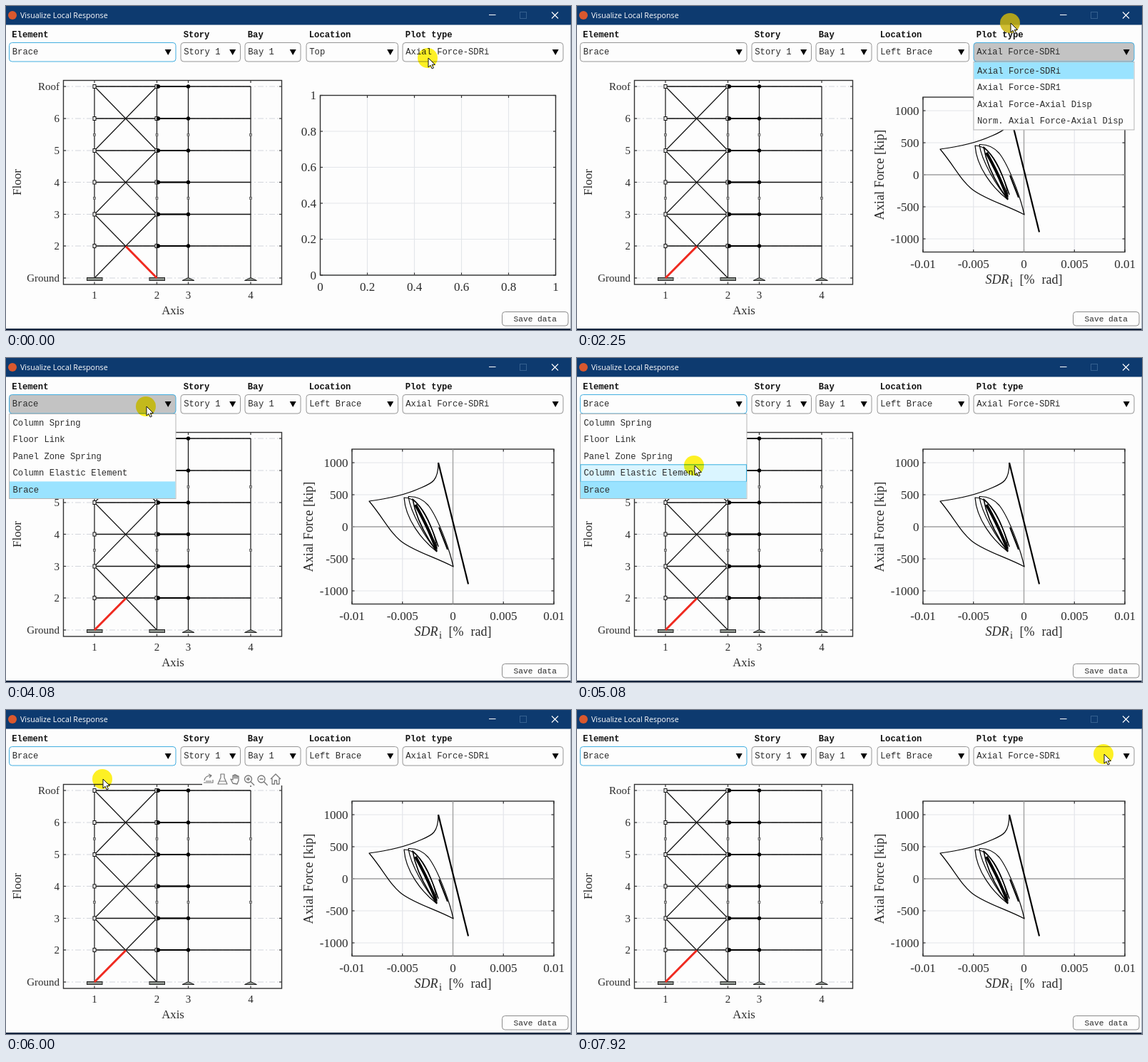
These frames come from a looping animation (792x455 px, 8 s). An HTML page:

```html
<!DOCTYPE html>
<html lang="en">
<head>
<meta charset="utf-8">
<title>Visualize Local Response</title>
<style>
  html, body { margin: 0; width: 100%; height: 100%; overflow: hidden; background: #fdfdfd; }
  svg { display: block; }
  text { white-space: pre; fill: #2b2b2b; font-family: "Liberation Serif", serif; }
  .mono { font: 12.2px "Liberation Mono", monospace; }
  .bold { font-weight: bold; fill: #111; }
  .title { font: 10.7px "Open Sans", sans-serif; fill: #fff; }
</style>
</head>
<body>
<svg id="stage" width="792" height="455" viewBox="0 0 792 455"></svg>
<script>
const LOOP = 8000, FPS = 12;

// ---- drawing helpers ----
const line = (x1, y1, x2, y2, stroke = '#111', width = 1.2, extra = '') =>
  `<line x1="${x1}" y1="${y1}" x2="${x2}" y2="${y2}" stroke="${stroke}" stroke-width="${width}" ${extra}/>`;
const rect = (x, y, w, h, fill, stroke = 'none', rx = 0, width = 1) =>
  `<rect x="${x}" y="${y}" width="${w}" height="${h}" rx="${rx}" fill="${fill}" stroke="${stroke}" stroke-width="${width}"/>`;
const path = (d, width = 1.2, stroke = '#000', fill = 'none') =>
  `<path d="${d}" fill="${fill}" stroke="${stroke}" stroke-width="${width}" stroke-linejoin="round"/>`;
const circle = (x, y, r, fill, extra = '') => `<circle cx="${x}" cy="${y}" r="${r}" fill="${fill}" ${extra}/>`;
const mono = (x, y, s, cls = '') => `<text class="mono ${cls}" x="${x}" y="${y}">${s}</text>`;
const serif = (x, y, s, size, anchor = 'middle', extra = '') =>
  `<text x="${x}" y="${y}" font-size="${size}" text-anchor="${anchor}" ${extra}>${s}</text>`;
const sideways = (x, y, s, size) => serif(x, y, s, size, 'middle', `transform="rotate(-90 ${x} ${y})"`);

// ---- window ----
function windowChrome() {
  return rect(0, 0, 792, 455, '#fdfdfd') + rect(0, 0, 792, 26.5, '#0d3a6f') +
    circle(9, 13, 6, '#d9582e') +
    '<text class="title" x="20" y="17">Visualize Local Response</text>' +
    line(677, 12.5, 686.5, 12.5, '#fff', 1) +
    rect(720.5, 8.5, 9, 9, 'none', '#35608f') +
    path('M765 8.5l9 9m0-9l-9 9', 1.1, '#fff') +
    rect(0, 453, 792, 2, '#16263f') + line(791.5, 26, 791.5, 455, '#8494a8', 0.7) +
    rect(695.5, 429.5, 92.5, 19.5, '#fdfdfd', '#8c8c8c', 4) +
    `<text class="mono" style="font-size:11.2px" x="711.5" y="443">Save data</text>`;
}

const FIELDS = [
  ['Element', 4.5, 238], ['Story', 245, 328.5], ['Bay', 335, 413],
  ['Location', 421, 549.5], ['Plot type', 556, 781],
];
const ELEMENTS = ['Column Spring', 'Floor Link', 'Panel Zone Spring', 'Column Elastic Element', 'Brace'];
const PLOT_TYPES = ['Axial Force-SDRi', 'Axial Force-SDR1', 'Axial Force-Axial Disp', 'Norm. Axial Force-Axial Disp'];
const ROW = 23.6, LIST_TOP = 79;

function fields(location, focused, pressed) {
  const values = ['Brace', 'Story 1', 'Bay 1', location, PLOT_TYPES[0]];
  return FIELDS.map(([label, x1, x2], i) =>
    mono(x1 + 3.8, 44, label, 'bold') +
    rect(x1, 51.5, x2 - x1, 26.5, i === pressed ? '#c3c3c3' : '#fdfdfd', i === focused ? '#42aee0' : '#969696', 4) +
    mono(x1 + 4.3, 68, values[i]) +
    path(`M${x2 - 15.3} 61h9l-4.5 8z`, 0, 'none', '#000')).join('');
}

function dropdown(field, items, selected, hovered) {
  const [, x1, x2] = FIELDS[field], w = x2 - x1;
  return rect(x1, LIST_TOP - 0.5, w, items.length * ROW + 1, '#fdfdfd', '#b5b5b5') +
    items.map((s, i) => {
      const y = LIST_TOP + i * ROW;
      const fill = i === selected ? rect(x1 + 0.5, y, w - 1, ROW, '#9ae3ff')
        : i === hovered ? rect(x1 + 0.5, y, w - 1, ROW, '#daf5ff', '#35aee0') : '';
      return fill + mono(x1 + 5, y + 15.5, s);
    }).join('');
}

// ---- building elevation ----
const FLOORS = [113, 158, 203, 247.5, 292.5, 337, 382];
const FLOOR_NAMES = ['Roof', 6, 5, 4, 3, 2, 'Ground'];
const AXES = [124, 211.5, 255.5, 343];

function building(leftBrace) {
  const [a, b, c, d] = AXES;
  let s = rect(80.5, 104.5, 306, 286.5, 'none', '#333', 0, 1.4);
  FLOORS.forEach((y, i) => {
    s += line(81, y, 386, y, '#d3d6dc', 1, 'stroke-dasharray="8 3 2 3"') +
      line(80.5, y, 84, y, '#333') + line(383, y, 386.5, y, '#333') +
      serif(75, y + 5.3, FLOOR_NAMES[i], 15, 'end');
  });
  AXES.forEach((x, i) => {
    s += line(x, 391, x, 387.5, '#333') + line(x, 104.5, x, 108, '#333') +
      line(x, 113, x, 382) + serif(x, 411, i + 1, 15) +
      rect(x - 1.5, 179.5, 3, 3, '#aaa', '#555', 0, 0.7) + rect(x - 1.5, 268.5, 3, 3, '#aaa', '#555', 0, 0.7);
  });
  for (const i of [0, 2, 4]) {
    s += line(a, FLOORS[i], b, FLOORS[i + 2]) + line(b, FLOORS[i], a, FLOORS[i + 2]);
  }
  for (const y of FLOORS.slice(0, 6)) {
    s += line(a, y, d, y, '#111', 1.3) + line(b, y, c, y, '#000', 2.2) +
      rect(a - 2, y - 2.5, 4, 5, '#fff', '#111') + rect(b - 2.5, y - 2.5, 4, 5, '#fff', '#111') +
      circle(b + 2, y, 2.7, '#000') + circle(c, y, 2.7, '#000');
  }
  for (const x of [a, b]) s += rect(x - 10.5, 381.5, 21.5, 4, '#8b918b', '#222');
  for (const x of [c, d]) s += path(`M${x - 8.5} 385.5h17l-8.5-4z`, 1, '#222', '#8b918b');
  s += leftBrace ? line(a, 382, 168, 337.5, '#f02a20', 3) : line(168, 337.5, b, 382, '#f02a20', 3);
  return s + sideways(21, 247.5, 'Floor', 17) + serif(234, 433, 'Axis', 16.8);
}

// ---- response plots ----
function axes(x, y, w, h, xLabels, yTicks, labelY) {
  let s = '';
  const stepX = w / (xLabels.length - 1);
  xLabels.forEach((label, i) => {
    const px = x + i * stepX;
    s += line(px, y, px, y + h, '#e3e6ea') + line(px, y + h, px, y + h - 3.5, '#333') +
      line(px, y, px, y + 3.5, '#333') + serif(px, labelY, label, 17);
  });
  for (const [label, py] of yTicks) {
    s += line(x, py, x + w, py, '#e3e6ea') + line(x, py, x + 3.5, py, '#333') +
      line(x + w, py, x + w - 3.5, py, '#333') + serif(x - 5.5, py + 5.7, label, 17, 'end');
  }
  return s + rect(x, y, w, h, 'none', '#333', 0, 1.4);
}

function emptyPlot() {
  const ticks = [0, 0.2, 0.4, 0.6, 0.8, 1];
  return axes(440.5, 125.5, 330, 252.5, ticks, ticks.map(v => [v, 378 - v * 252.5]), 400);
}

function forcePlot(x, y, w, h, zeroY, perThousand, labelY) {
  const yTicks = [1000, 500, 0, -500, -1000].map(v => [v, zeroY - v / 1000 * perThousand]);
  const mid = x + w / 2, titleY = labelY + 21.5;
  return axes(x, y, w, h, [-0.01, -0.005, 0, 0.005, 0.01], yTicks, labelY) +
    line(x, zeroY, x + w, zeroY, '#a3a3a3', 1.4) + line(mid, y, mid, y + h, '#a3a3a3', 1.4) +
    sideways(430, zeroY, 'Axial Force [kip]', 18.3) +
    serif(mid - 54, titleY, 'SDR', 18, 'start', 'font-style="italic"') +
    serif(mid - 19.5, titleY + 4, 'i', 14.5, 'start') +
    serif(mid - 6, titleY, '[%', 18, 'start') + serif(mid + 25, titleY, 'rad]', 18, 'start');
}

const firstPlot = () => forcePlot(485.5, 127.5, 281, 217, 236, 84.5, 366) +
  path('M647 151L606 311', 2.2) +
  path('M606 311Q602 320 592 323Q585 324.5 560 324.5L509 325Q508 317 515 297L521 277Q546 193 570 170' +
       'Q582 158 586 163C592 175 606 182 627 189C619 230 604 255 585 269Q570 278 564 293' +
       'C565 275 584 227 604 189Q602 212 592 235C580 268 566 280 558 294C559 272 580 222 603 189') +
  path('M606 194Q596 240 571 280Q578 235 603 191', 1.5) +
  path('M573 275Q592 232 602 196', 4) + path('M619 204L607 234', 2);

const secondPlot = () => forcePlot(485, 128, 283, 217.5, 237, 90, 368) +
  path('M606 147L648 317.5', 2.2) +
  path('M606 147C606 173 597 176 580 183C560 192 540 197 509 201C530 226 539 247 556 259' +
       'C576 273 600 279 627 293C622 270 606 225 592 207Q581 194 564 194.500' +
       'C567 217 588 253 604 271Q604 255 592 228Q577 196 558 196C560 226 582 255 604 272') +
  path('M606 265Q590 215 570 198Q576 233 604 272', 1.5) +
  path('M574 206Q592 238 603 268', 4) + path('M607 238L619 269', 2);

// ---- axes toolbar, placed by the top right corner of its axes ----
function toolbar(right, top) {
  const zoom = (x, sign) => `M${x + 4} -7a5 5 0 1 1-10 0a5 5 0 1 1 10 0zM${x + 2.6} -3.300l5 5M${x - 3.5} -7h5${sign}`;
  return `<g transform="translate(${right} ${top})">` + rect(-112, -16, 114, 18, '#fdfdfd') +
    path('M-110 -2h13v-4M-109 -5c1-6 5-7 9-7m-3-2l4 2-3 3M-107 -4h8', 1.2, '#777') +
    path('M-86 -14h5v5l4 9h-13l4-9zM-88 -4h9', 1.2, '#777') +
    path('M-69 -1l-3-6 3 1v-6h2v4-5h2v5-4h2v4-3h2v6l-2 5z', 1.3, '#777') +
    path(zoom(-46.5, 'm-2.5-2.500v5'), 1.3, '#777') + path(zoom(-28, ''), 1.3, '#777') +
    path('M-16 -7l7-7 7 7M-14 -8v8h3.500v-5h3v5h3.500v-8', 1.3, '#777') + '</g>';
}

// ---- pointer: [tick, x, y] ----
const POINTER = [
  [0, 592, 73], [3, 610, 57], [14, 610, 57], [15, 603, 65], [19, 605, 66], [24, 597, 31], [26, 597, 31],
  [27, 608, 24], [32, 608, 24], [37, 571, 42], [40, 571, 42], [44, 197, 68], [56, 197, 68],
  [58, 185, 124], [60, 185, 124], [61, 165, 151], [67, 155, 186], [70, 155, 186], [72, 136, 97],
  [76, 300, 290], [79, 560, 250], [84, 673, 73], [94, 673, 73], [95, 739, 62],
];

function pointerAt(tick) {
  const next = POINTER.findIndex(key => key[0] >= tick);
  const [t1, x1, y1] = POINTER[next], [t0, x0, y0] = POINTER[Math.max(0, next - 1)];
  const k = t1 === t0 ? 1 : (tick - t0) / (t1 - t0);
  return [x0 + (x1 - x0) * k, y0 + (y1 - y0) * k];
}

const halo = (x, y, pressed) => circle(x - 1, y, 14, pressed ? '#c9b30f' : '#fff000', 'opacity="0.86"');
const arrow = (x, y) =>
  path(`M${x} ${y}v13l3-2.800 2.200 4.800 2.200-1-2.200-4.600h4.200z`, 1, '#111', '#fff');

function scene(tick) {
  const within = (from, to) => tick >= from && tick < to;
  const [x, y] = pointerAt(tick);
  const ready = tick >= 15;
  const plotListOpen = within(20, 33), elementListOpen = within(43, 70);
  const focused = within(20, 43) ? 4 : 0;
  const pressed = plotListOpen ? 4 : within(43, 57) ? 0 : -1;

  let s = windowChrome() + building(ready) +
    (!ready ? emptyPlot() : tick < 18 ? firstPlot() : secondPlot());
  if (tick >= 70 && y > 85) s += x < 400 ? toolbar(387, 104) : y > 105 ? toolbar(768, 128) : '';
  s += fields(ready ? 'Left Brace' : 'Top', focused, pressed);
  if (plotListOpen) s += dropdown(4, PLOT_TYPES, 0, -1);
  // The halo sits beneath the field text, as a tint would.
  if (elementListOpen) s += dropdown(0, ELEMENTS, 4, Math.floor((y - LIST_TOP) / ROW));
  return s + `<g style="mix-blend-mode:${y < 40 ? 'normal' : 'multiply'}">${halo(x, y, within(26, 33))}</g>` + arrow(x, y);
}

const stage = document.getElementById('stage');
let shown = -1;
function frame(now) {
  const tick = Math.min(95, Math.floor((now % LOOP + 4) * FPS / 1000));
  if (tick !== shown) stage.innerHTML = scene(shown = tick);
  requestAnimationFrame(frame);
}
frame(performance.now());
</script>
</body>
</html>
```
